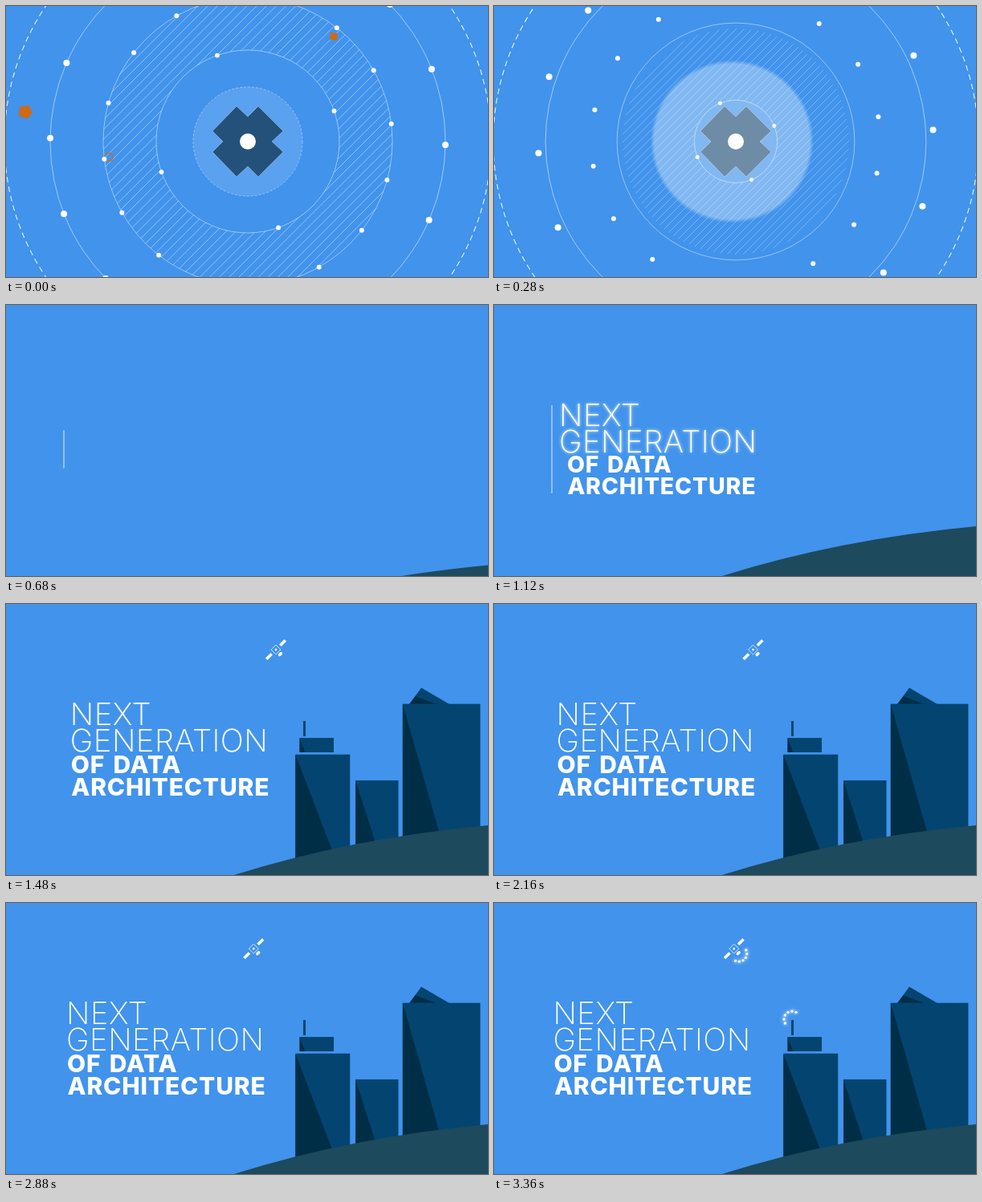
Animation, 600 px wide and 338 px high, one loop 3.4 s. Source, as an HTML page with a canvas:

```html
<!DOCTYPE html>
<html lang="en">
<head>
<meta charset="utf-8">
<title>Next generation of data architecture</title>
<style>
html, body { margin: 0; width: 100%; height: 100%; overflow: hidden; background: #4193ec; }
canvas { display: block; width: 600px; height: 338px; }
</style>
</head>
<body>
<canvas id="stage" width="600" height="338"></canvas>
<script>
const ctx = document.getElementById('stage').getContext('2d');
const LOOP = 3400, TAU = Math.PI * 2, CX = 301, CY = 169;
const BLUE = '#4193ec', NAVY = '#034570', SHADE = '#012e47', HILL = '#1e4a5d', ORANGE = '#cf6a14';

const part = (t, start, length) => Math.min(1, Math.max(0, (t - start) / length));
const easeOut = k => 1 - (1 - k) ** 3;
const collapse = (t, start, length) => 1 - part(t, start, length) ** 2;
const white = a => `rgba(255,255,255,${a})`;

function layer(draw) {
  ctx.save();
  draw();
  ctx.restore();
}

function disc(x, y, r, fill) {
  ctx.beginPath();
  ctx.arc(x, y, Math.max(0, r), 0, TAU);
  ctx.fillStyle = fill;
  ctx.fill();
}

function ring(r, alpha, width = 1, dash = []) {
  if (r < 0.5) return;
  ctx.beginPath();
  ctx.arc(CX, CY, r, 0, TAU);
  ctx.setLineDash(dash);
  ctx.lineWidth = width;
  ctx.strokeStyle = white(alpha);
  ctx.stroke();
  ctx.setLineDash([]);
}

function poly(fill, ...pts) {
  ctx.beginPath();
  for (let i = 0; i < pts.length; i += 2) ctx.lineTo(pts[i], pts[i + 1]);
  ctx.closePath();
  ctx.fillStyle = fill;
  ctx.fill();
}

function ngon(x, y, r, sides, turn) {
  ctx.beginPath();
  for (let i = 0; i < sides; i++) {
    const a = turn + i * TAU / sides;
    ctx.lineTo(x + r * Math.cos(a), y + r * Math.sin(a));
  }
  ctx.closePath();
}

function dots(r, count, degrees, size) {
  if (r < 0.5) return;
  for (let i = 0; i < count; i++) {
    const a = degrees * TAU / 360 + i * TAU / count;
    disc(CX + r * Math.cos(a), CY + r * Math.sin(a), size, '#fff');
  }
}

function hatch(outer, inner, scale, alpha) {
  if (outer < 1) return;
  layer(() => {
    ctx.translate(CX, CY);
    ctx.beginPath();
    ctx.arc(0, 0, outer, 0, TAU);
    ctx.arc(0, 0, inner, 0, TAU, true);
    ctx.clip();
    ctx.rotate(-Math.PI / 4);
    ctx.beginPath();
    const gap = Math.max(2, 8.6 * scale);
    for (let y = -Math.floor(outer / gap) * gap; y < outer; y += gap) {
      ctx.moveTo(-outer, y);
      ctx.lineTo(outer, y);
    }
    ctx.strokeStyle = white(alpha);
    ctx.lineWidth = 0.9;
    ctx.stroke();
  });
}

function cross(scale) {
  if (scale <= 0) return;
  layer(() => {
    ctx.translate(CX, CY);
    ctx.scale(scale, scale);
    poly('#245179', -14, -44, 0, -31, 13, -44, 44, -13, 30, 0, 44, 13,
      13, 44, 0, 31, -14, 44, -44, 13, -31, 0, -44, -13);
    ctx.strokeStyle = white(0.4);
    ctx.lineWidth = 0.8;
    ctx.stroke();
  });
}

function orangeShapes(t) {
  const k = part(t, 0, 280);
  if (k === 1) return;
  const s = 1 - k * k;
  const at = (x, y) => [CX + (x - CX) * s, CY + (y - CY) * s];
  layer(() => {
    ctx.globalAlpha = s;
    ctx.fillStyle = ctx.strokeStyle = ORANGE;
    ngon(...at(24, 132), 9.2, 5, 0.1 - k);
    ctx.fill();
    ngon(...at(408, 38), 6.3, 4, 0.95 - k);
    ctx.fill();
    ngon(...at(128, 188.5), 5.3, 7, k);
    ctx.lineWidth = 1.2;
    ctx.stroke();
  });
}

function flash(t) {
  const k = Math.max(0, (t - 150) / 250);
  const alpha = 0.34 * (1 - part(t, 440, 150));
  if (!k || !alpha) return;
  const r = 268 * k ** 1.5, x = CX - 17 * Math.min(1.5, k * k);
  const glow = ctx.createRadialGradient(x, CY, Math.max(0, r - 5), x, CY, r);
  glow.addColorStop(0, white(alpha));
  glow.addColorStop(1, white(0));
  disc(x, CY, r, glow);
}

function radar(t) {
  if (t > 720) return;
  const inner = 114 * collapse(t, 0, 380);
  const band = collapse(t, 112, 400);
  const wide = collapse(t, 204, 400);
  const rim = collapse(t, 258, 400);
  const lag = collapse(t, 314, 350);
  const core = collapse(t, 420, 180);
  const halo = collapse(t, 60, 300);

  hatch(180 * band * (1 - 0.08 * part(t, 112, 288)), inner, band, 0.45 - 0.2 * part(t, 100, 300));
  ring(inner, 0.45);
  ring(180 * band, 0.45);
  ring(246 * wide, 0.5);
  ring(303 * rim, 0.9, 1.1, [7, 5]);
  if (halo > 0) {
    disc(CX, CY, 68 * halo, white(0.13));
    ring(68 * halo, 0.5, 0.8, [3, 2]);
  }
  orangeShapes(t);
  cross(core);
  flash(t);
  disc(CX, CY, 10 * core, '#fff');
  if (inner > 20) dots(inner, 4, -19.5 - t * 0.01, 2.9 * Math.min(1, inner / 60));
  dots(180 * lag, 16, -7 - t * 0.01, 3 * lag);
  dots(246 * lag, 16, 1 - t * 0.0155, 4 * lag);
}

function hill(t) {
  const k = part(t, 640, 420);
  if (!k) return;
  const y = 66 * (1 - easeOut(k));
  ctx.beginPath();
  ctx.moveTo(284, 338 + y);
  ctx.quadraticCurveTo(430, 292 + y, 600, 276 + y);
  ctx.lineTo(600, 420);
  ctx.lineTo(284, 420);
  ctx.fillStyle = HILL;
  ctx.fill();
}

function rise(t, start, depth, draw) {
  const k = part(t, start, 320);
  if (!k) return;
  layer(() => {
    ctx.translate(0, depth * (1 - easeOut(k)));
    draw();
  });
}

function box(x, y, w, h) {
  ctx.fillStyle = NAVY;
  ctx.fillRect(x, y, w, h);
}

function city(t) {
  rise(t, 1130, 180, () => {
    box(360.3, 187.7, 67.9, 150);
    poly(SHADE, 360.3, 187.7, 415, 331, 360.3, 331);
    box(365.5, 167, 42.5, 18);
    poly(SHADE, 365.5, 167, 372, 185, 365.5, 185);
    box(370, 146, 3, 19);
  });
  rise(t, 1170, 90, () => {
    box(435, 220, 53.5, 118);
    poly(SHADE, 435, 220, 471, 332, 435, 332);
  });
  rise(t, 1150, 190, () => {
    poly(NAVY, 517, 104.5, 552, 125, 502, 125);
    poly(SHADE, 502, 125, 509.5, 115, 536, 125);
    box(493.8, 124.6, 96.6, 213);
    poly(SHADE, 493.8, 124.6, 553, 333, 493.8, 333);
  });
}

function signal(x, y, from, to, u) {
  if (u <= 0 || u >= 500) return;
  const r = 4 + 7.5 * part(u, 0, 500), count = 6;
  layer(() => {
    ctx.globalAlpha = part(u, 0, 160) * (1 - part(u, 420, 80));
    ctx.shadowColor = '#fff';
    ctx.shadowBlur = 4;
    for (let i = 0; i < count; i++) {
      const a = (from + (to - from) * i / (count - 1)) * TAU / 360;
      disc(x + r * Math.cos(a), y + r * Math.sin(a), 1.7, '#fff');
    }
  });
}

function satellite(t) {
  const shown = part(t, 1160, 160);
  if (!shown) return;
  const x = 336 - 0.0198 * (t - 1480), y = 57;
  layer(() => {
    ctx.globalAlpha = shown;
    ctx.translate(x, y);
    ctx.rotate(-Math.PI / 4);
    ctx.fillStyle = ctx.strokeStyle = '#fff';
    ctx.fillRect(7.5, -1.8, 9.2, 3.6);
    ctx.fillRect(-16.7, -1.8, 9.2, 3.6);
    ctx.lineWidth = 0.7;
    ctx.strokeRect(-4.2, -4.2, 8.4, 8.4);
    disc(0, 0, 1.4, '#fff');
    ctx.beginPath();
    ctx.ellipse(0, 7.8, 3, 1.9, 0, 0, TAU);
    ctx.fill();
  });
  for (const start of [2300, 2960]) {
    signal(x + 6, y + 6, 115, -25, t - start);
    signal(371, 145, 150, 300, t - start);
  }
}

function headline(t) {
  const x = 83 - 0.0034 * (t - 1120);
  const bar = 55 * easeOut(part(t, 640, 240)) * (1 - part(t, 1160, 220) ** 2);
  if (bar > 0) {
    ctx.fillStyle = white(0.85);
    ctx.fillRect(71.5, 180 - bar, 1, bar * 2);
  }
  ctx.fillStyle = '#fff';

  const slide = part(t, 720, 300);
  if (slide) layer(() => {
    ctx.beginPath();
    ctx.rect(72, 100, 400, 100);
    if (slide < 1) ctx.clip();
    ctx.font = '150 38.5px Inter, "Open Sans", sans-serif';
    ctx.letterSpacing = '0.45px';
    const glow = 1 - part(t, 1120, 560);
    if (glow) {
      ctx.shadowColor = white(0.9 * glow);
      ctx.shadowBlur = 4 * glow;
    }
    const left = x - 2 - 250 * (1 - easeOut(slide));
    ctx.fillText('NEXT', left, 151.3);
    ctx.fillText('GENERATION', left, 183.5);
  });

  const grow = part(t, 900, 440);
  if (grow) layer(() => {
    const s = 1 - 0.4 * (1 - grow) ** 3;
    ctx.globalAlpha = part(t, 900, 120);
    ctx.translate(x + 180, 179);
    ctx.scale(s, s);
    ctx.font = '800 30px Inter, "Open Sans", sans-serif';
    ctx.letterSpacing = '0.8px';
    ctx.wordSpacing = '3px';
    ctx.fillText('OF DATA', -181, 31.5);
    ctx.fillText('ARCHITECTURE', -180.5, 59.5);
  });
}

function render(t) {
  ctx.fillStyle = BLUE;
  ctx.fillRect(0, 0, 600, 338);
  radar(t);
  city(t);
  hill(t);
  satellite(t);
  headline(t);
}

const began = performance.now();
function tick() {
  render((performance.now() - began) % LOOP);
  requestAnimationFrame(tick);
}
tick();
</script>
</body>
</html>
```
